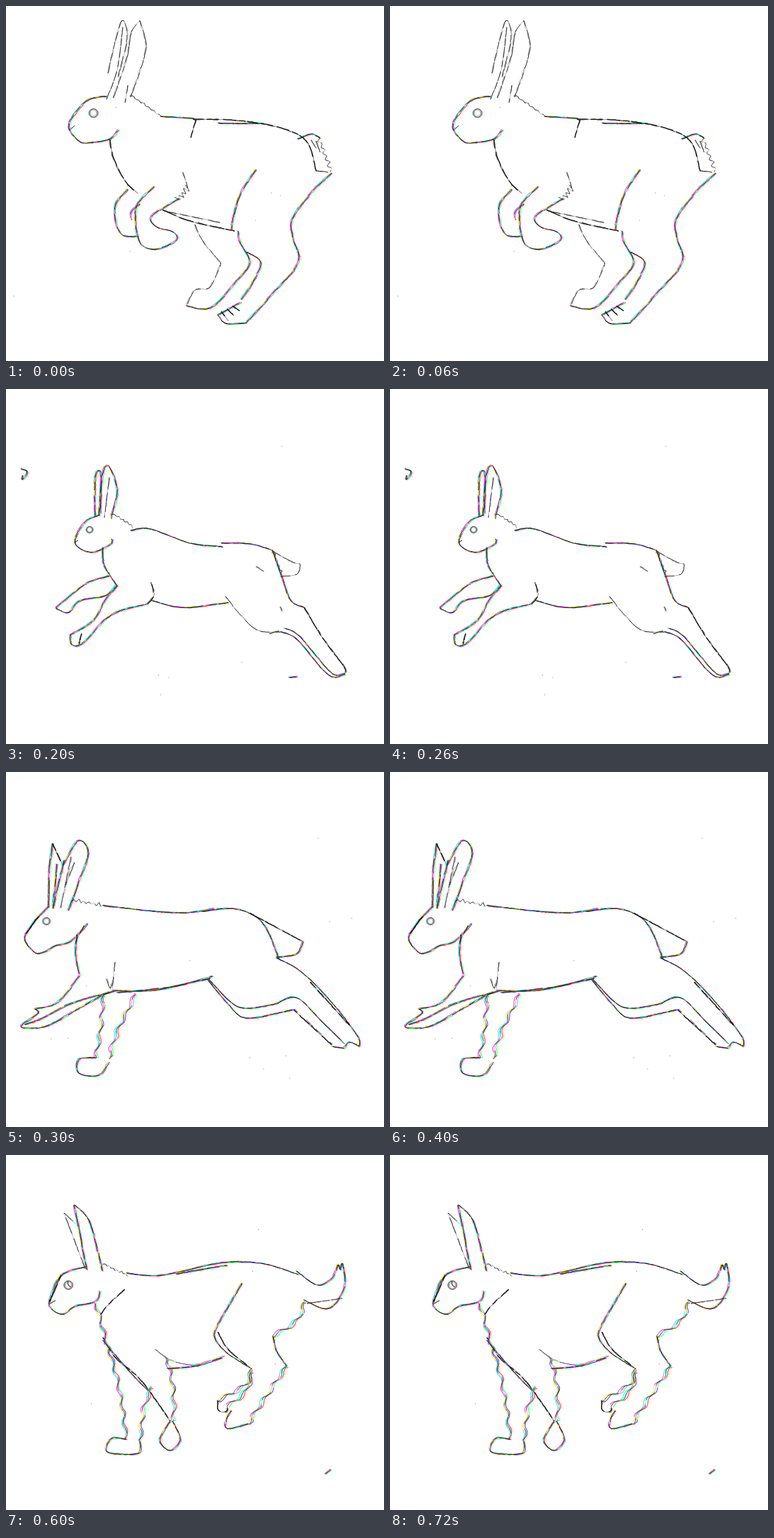
These frames come from a looping animation (534 by 502 pixels, 800 ms). An HTML page:

```html
<!DOCTYPE html>
<html lang="en">
<head>
<meta charset="utf-8">
<title>Running hare</title>
<style>
html, body { margin: 0; width: 100%; height: 100%; overflow: hidden; background: #fff; }
svg { display: block; width: 534px; height: 502px; }
path, circle { fill: none; stroke-linejoin: round; }
g { visibility: hidden; }
.long { animation: long 800ms step-end infinite; }
.short { animation: short 800ms step-end infinite; }
@keyframes long { 0% { visibility: visible; } 25%, 100% { visibility: hidden; } }
@keyframes short { 0% { visibility: visible; } 12.5%, 100% { visibility: hidden; } }
</style>
</head>
<body>
<svg id="stage" viewBox="0 0 534 502"></svg>
<script>
const stage = document.getElementById('stage');
// Colours that split to the left and right of a scanned line
const splits = [['#0ee', '#f22'], ['#f2e', '#3f5'], ['#fe2', '#42f']];
const probe = add(stage, 'path', { visibility: 'hidden' });
let layer, seed = 7;

function rnd(lo, hi) {
  seed = seed * 16807 % 2147483647;
  return lo + (hi - lo) * seed / 2147483647;
}

function add(parent, tag, attrs) {
  const el = document.createElementNS('http://www.w3.org/2000/svg', tag);
  for (const key in attrs) el.setAttribute(key, attrs[key]);
  return parent.appendChild(el);
}

// Catmull-Rom spline through "x y x y ..."; a bar marks a sharp corner
function spline(text) {
  let d = '', corner;
  for (const part of text.split('|')) {
    const n = part.trim().split(' ').map(Number);
    const pts = corner ? [corner] : [];
    for (let i = 0; i < n.length; i += 2) pts.push([n[i], n[i + 1]]);
    d += d ? '' : 'M' + pts[0];
    for (let i = 0; i < pts.length - 1; i++) {
      const b = pts[i], c = pts[i + 1], a = pts[i - 1] || b, e = pts[i + 2] || c;
      d += `C${b.map((v, k) => v + (c[k] - a[k]) / 6)} ${c.map((v, k) => v - (e[k] - b[k]) / 6)} ${c}`;
    }
    corner = pts.at(-1);
  }
  return d;
}

// Resample a curve with a shaky hand and an optional sideways wave
function rough(text, shake, wave = 0, phase = 0) {
  probe.setAttribute('d', spline(text));
  const length = probe.getTotalLength(), count = Math.ceil(length / 3), pts = [];
  for (let i = 0; i <= count; i++) {
    const s = length * i / count, p = probe.getPointAtLength(s), q = probe.getPointAtLength(s - 2);
    const turn = Math.atan2(p.y - q.y, p.x - q.x), off = wave * Math.sin(s / 4 + phase);
    pts.push([p.x - off * Math.sin(turn) + rnd(-shake, shake), p.y + off * Math.cos(turn) + rnd(-shake, shake)]
      .map(v => v.toFixed(1)));
  }
  return 'M' + pts.join('L');
}

const ink = (d, stroke, width, opacity, attrs) =>
  add(layer, 'path', { d, stroke, 'stroke-width': width, opacity, ...attrs });

const breaks = (on, off) =>
  Array.from({ length: 8 }, (_, i) => (i % 2 ? rnd(1, off) : rnd(on / 3, on)).toFixed(1)).join(' ');

function graphite(text, width, wave) {
  ink(rough(text, .3, wave), '#333', width * .75, .55);
  ink(rough(text, .35, wave), '#000', width, .8, { 'stroke-dasharray': breaks(24, 9) });
  ink(rough(text, .3, wave), '#222', width * .7, .6, {
    'stroke-dasharray': breaks(14, 24), transform: `translate(${rnd(-1.3, 1.3)} ${rnd(-1, 1)})`
  });
}

// The colour pairs take turns along the line
function halo(text, spread, wave) {
  const run = rnd(16, 30), start = rnd(0, 90);
  splits.forEach((pair, i) => pair.forEach((color, side) => {
    const shift = side ? spread : -spread;
    ink(rough(text, .4, wave, shift / 3), color, 1.1, .85, {
      transform: `translate(${shift} ${shift / 2})`,
      'stroke-dasharray': `${run} ${2 * run}`, 'stroke-dashoffset': start - i * run
    });
  }));
}

const pencil = (...lines) => lines.forEach(l => graphite(l, .9));
const bold = (...lines) => lines.forEach(l => graphite(l, 1.5));
const fringe = (...lines) => lines.forEach(l => { halo(l, 1.1); graphite(l, .9); });
const wavy = (...lines) => lines.forEach(l => { halo(l, 1.7, 2.2); graphite(l, .7, 2.2); });

function fur(x1, y1, x2, y2, tufts, size) {
  const len = Math.hypot(x2 - x1, y2 - y1), nx = (y2 - y1) / len, ny = (x1 - x2) / len;
  const pts = [];
  for (let i = 0; i <= 2 * tufts; i++) {
    const t = i / (2 * tufts), out = (i % 2 ? size : -size) * rnd(.5, 1.1);
    pts.push(`${x1 + (x2 - x1) * t + nx * out} ${y1 + (y2 - y1) * t + ny * out}`);
  }
  graphite(pts.join('|'), .7);
}

function eye(cx, cy, r) {
  splits[0].forEach((stroke, i) => add(layer, 'circle', { cx: cx + i * 2 - 1, cy, r, stroke, opacity: .5 }));
  add(layer, 'circle', { cx, cy, r, stroke: '#333', 'stroke-width': .9 });
  add(layer, 'circle', { cx, cy, r: r * .7, stroke: '#777', 'stroke-width': .6 });
}

function pose(length, start, dust) {
  layer = add(stage, 'g', { class: length, style: `animation-delay:${start - 800}ms` });
  while (dust--) {
    add(layer, 'circle', { cx: rnd(11, 510), cy: rnd(64, 440), r: .6, style: 'fill:#888' });
  }
}

// Gathered
pose('long', 0, 6);
pencil('144 95 153 55 164 20 171 46 158 101', '165 30 157 90 142 132');
pencil('152 130 171 73 177 38 189 20|198 55 190 90 176 129', '172 112 168 137', '89 176 97 169');
fringe('143 128 128 129 110 137 89 168 103 191 120 193 147 188 159 175');
eye(123.5, 151.5, 6);
fur(176, 126, 220, 156, 6, 1.5);
fringe('218 156 266 159', '300 166 365 166', '412 188 432 181 444 187');
bold('264 160 330 162 390 173 425 192 438 233', '268 161 261 186');
fur(440, 182, 460, 234, 6, 3.5);
pencil('431 189 438 201', '438 191 444 207', '438 233 455 235');
fringe('460 236 432 263 405 300 405 328 413 362 378 405 340 447');
fringe('353 231 329 270 318 315');
pencil('267 309 278 332 304 364|293 390 285 400 267 402 255 424');
fringe('255 424 290 426 328 386 344 362 331 335 328 318', '340 348 360 363 347 393 332 415');
fringe('340 448 311 449 299 437|332 419');
for (let i = 0; i < 3; i++) bold(`${304 + 8 * i} ${432 - 4 * i} ${314 + 8 * i} ${445 - 7 * i}`);
bold('221 288 260 304 323 318', '147 189 152 215 168 247 186 265');
pencil('230 291 302 306', '250 235 257 257');
fringe('172 259 154 283 161 321 186 326', '189 280 177 291 177 302');
fringe('209 255 184 285 188 332 210 344 241 331 235 319 212 312 206 297 245 272');
fur(258, 257, 242, 274, 4, 6);

// Full stretch
pose('short', 200, 6);
fringe('126 180 126 124 134 120 133 175', '131 179 136 125 144 108 157 143 148 183');
pencil('146 125 139 182', '97 217 102 214');
fringe('132 178 112 188 97 217 120 231 146 221 150 212');
eye(118, 199, 4.5);
fur(150, 176, 180, 195, 5, 2);
fringe('176 200 204 198 260 218 306 223', '304 218 345 219 376 228');
pencil('376 229 405 245 416 247|411 262 388 265');
fur(378, 230, 389, 262, 4, 2.5);
fringe('376 228 392 272 402 299 421 309');
bold('421 309 448 353 477 392 479 402');
fringe('479 402 459 401 415 350 393 338', '388 343 412 355 455 404 479 403');
pencil('310 293 330 318 355 341 388 344', '372 346 386 342', '353 251 364 258', '387 308 390 314');
fringe('206 299 250 309 314 302', '136 224 139 250 157 279');
fringe('146 264 115 274 92 291 70 310|88 316 103 300 140 292 156 277');
fringe('157 278 140 299 122 328 91 348|93 362 110 358 149 319 200 304');
bold('200 304 209 292 205 273', '107 346 103 361');
fringe('21 113 30 117 23 129 24 122', '400 408 412 407');

// Reaching down
pose('long', 300, 12);
fringe('66 101 61 140 60 192', '72 130 66 190');
bold('66 101 80 132');
fringe('80 132 102 97 116 115 101 160 88 196', '82 125 66 193');
pencil('92 120 77 192', '97 128 84 160');
fringe('60 191 44 206 28 229|27 240 42 256 58 253 68 246 92 239 115 214');
bold('46 204 28 229');
eye(57, 211, 5);
fur(92, 181, 142, 189, 7, 3);
fringe('137 189 240 199 294 193', '276 197 320 193 355 206 374 234 385 265');
bold('345 200 375 216 420 240');
fringe('420 240 410 257 382 262', '382 263 415 281 455 320 495 371 499 388|485 382 478 391|460 388');
bold('430 297 485 358', '460 386 406 336');
fringe('286 293 328 332 375 329 410 319 445 352 478 384', '285 294 313 327 340 348 405 336');
fringe('150 309 215 308 292 289', '157 312 225 305 288 292');
pencil('154 269 150 306', '142 293 147 306 150 295', '110 217 97 243');
fringe('100 230 98 258 104 287', '104 288 72 326 40 335|45 341 22 357|25 362 60 358 115 327 146 311');
fringe('26 357 50 349 90 328 155 309');
wavy('138 315 133 365 127 404', '184 314 160 360 145 405');
fringe('127 404 103 406 103 426 131 429 145 410');

// Landing
pose('short', 500, 4);
pencil('118 172 110 101|122 135 124 170', '125 172 121 97|136 106 146 148 142 175');
fringe('138 118 146 148 142 175', '138 118 134 172');
fringe('120 172 107 193 93 218 106 233 125 225 158 207');
eye(118.5, 190.5, 4);
fur(150, 160, 188, 190, 6, 1.5);
fringe('183 196 199 189 272 187 328 172', '338 173 380 176 408 190 414 225 418 252');
fringe('404 187 430 203 458 204|447 224 411 229', '414 222 452 214');
fur(426, 238, 432, 249, 2, 3);
fringe('417 254 458 242 468 260');
wavy('466 266 463 300 469 345', '437 278 445 310 449 338');
bold('469 345 467 352 449 338', '440 282 468 351');
fringe('437 278 390 297 355 296 341 270 334 224');
halo('188 297 250 302 315 293 371 277', 1);
fringe('188 297 260 302 345 287');
pencil('134 222 145 247', '205 261 218 249');
fringe('163 226 147 255 146 275');
wavy('146 275 128 318 112 344', '118 353 160 323 187 300');
bold('112 344 84 363|104 370 118 353', '118 350 150 322 182 301');
fringe('190 299 190 282 207 260', '180 302 202 325', '190 301 230 306');
wavy('202 325 206 365 205 390', '235 308 226 370 218 400');
fringe('205 390 180 402 190 414 220 415 218 400', '16 125 19 132 20 124 22 134');
for (const y of [92, 93.5]) {
  ink(`M20 ${y}H486`, '#688', 1.4, .35, { 'stroke-dasharray': breaks(20, 22) });
}

// Standing over the forelegs
pose('long', 600, 4);
pencil('112 161 82 82|99 98');
fringe('114 162 96 70|118 95 136 164');
fringe('114 158 78 170 62 205 65 218 80 225 97 214 127 207 133 192');
bold('78 170 62 207');
eye(88, 184, 6);
pencil('62 210 70 206', '88 179 88 184 92 187');
fur(137, 154, 172, 170, 6, 2);
fringe('170 167 220 170 300 153 360 153 413 169', '240 168 312 156');
fringe('410 164 440 184 462 174|469 154|472 163|475 153 478 188 455 217 421 205');
pencil('425 210 475 203');
fringe('333 181 305 230 294 255 310 278 346 302');
bold('299 250 315 276 347 302');
wavy('347 302 338 325 299 347', '348 306 338 335 313 355');
bold('299 347 300 361 311 363 313 355');
wavy('422 207 410 235 377 256', '397 299 375 330 342 380');
fringe('377 256 382 277 397 299', '342 380 313 387 311 374 318 361');
bold('168 190 144 212 134 226', '137 258 155 287 190 318 232 376');
wavy('127 210 135 240 145 275', '145 275 160 330 170 402', '206 328 194 362 189 404');
fringe('137 262 175 307 205 337', '170 402 149 401 143 420 186 422 189 404');
wavy('228 288 236 332 237 376');
fringe('232 376 217 403 232 418 246 403 235 376', '228 302 265 299 305 287');
pencil('228 288 211 275');
halo('226 288 265 297 308 284', 1);
fringe('451 451 459 445');
</script>
</body>
</html>
```
